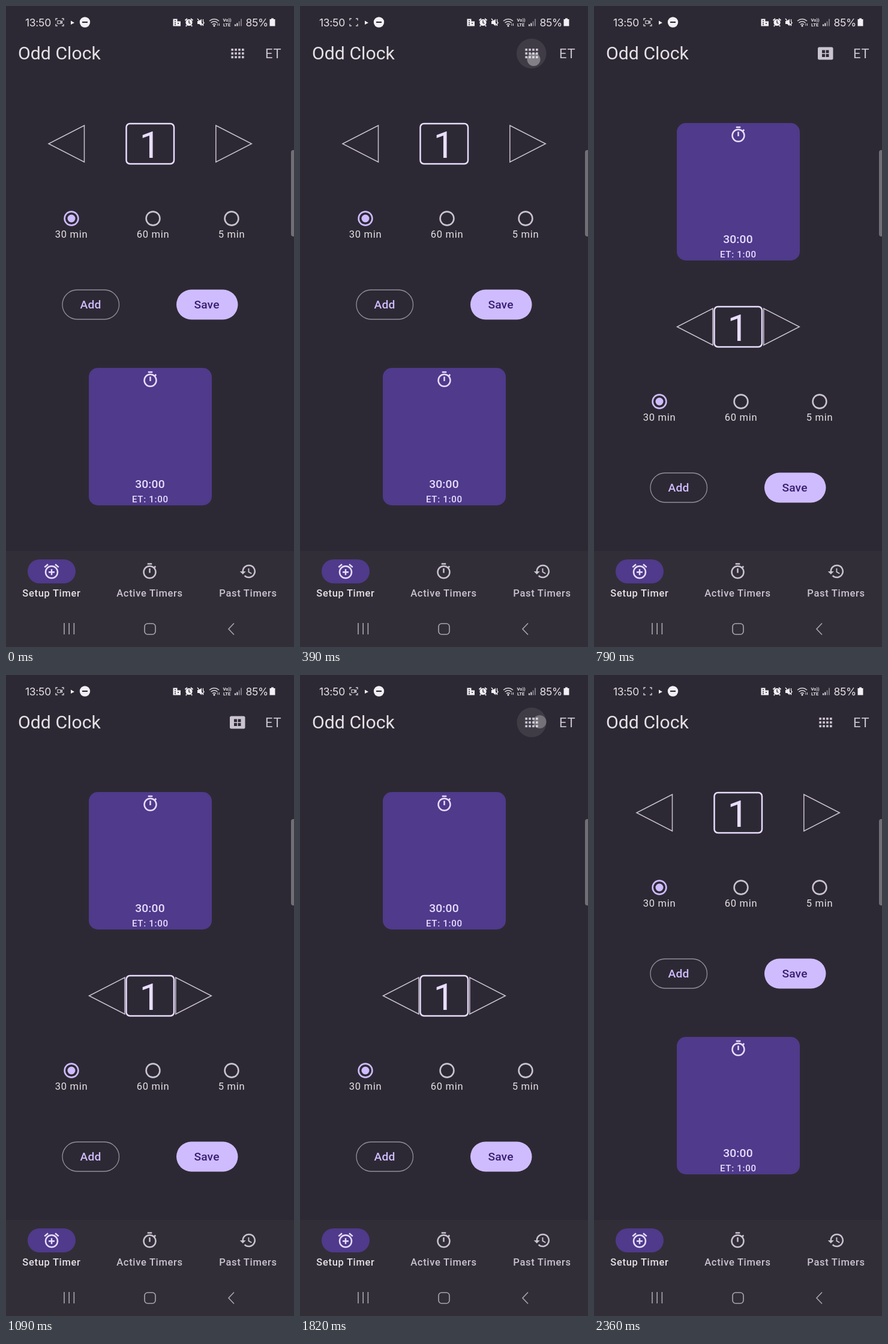
Write an HTML page that moves like this. It is 480 by 1068 pixels and loops after 2.39 s.

```html
<!DOCTYPE html>
<html lang="en">
<head>
<meta charset="utf-8">
<title>Timer</title>
<style>
html, body { margin: 0; width: 100%; height: 100%; overflow: hidden; background: #2d2934; }
svg { display: block; width: 480px; height: 1068px; }
text { font-family: Roboto, sans-serif; fill: #e6e1e5; }
.mid { text-anchor: middle; }
.label { font-size: 16.5px; letter-spacing: .69px; }
.bold { font-weight: 500; }
.button { font-size: 19.25px; font-weight: 500; letter-spacing: .14px; }
.status { font: 17.5px Inter, sans-serif; letter-spacing: -.3px; }
.tiny { font-size: 7.5px; font-weight: 700; }
.line { fill: none; stroke: #cac4d0; }
.soft { fill: #cac4d0; }
.pale { color: #e8ddff; }
.gray { color: #cac4d0; }
</style>
</head>
<body>
<svg viewBox="0 0 480 1068">
  <defs>
    <g id="timer" fill="none" stroke="currentColor" stroke-width="2">
      <circle cx="12" cy="13" r="8"/>
      <path d="M9 2h6M12 8v6M18 7l1.8-1.8"/>
    </g>
    <g id="alarm" fill="none" stroke="currentColor" stroke-width="2">
      <circle cx="12" cy="13" r="8"/>
      <path d="M2.6 6.5l4.6-3.9M21.4 6.5l-4.6-3.9M8 13h8M12 9v8"/>
    </g>
    <g id="history" fill="none" stroke="currentColor" stroke-width="2">
      <path d="M5 12a8 8 0 1 1 2.35 5.65"/>
      <path d="M12.75 8v4.7l3.9 2.3" stroke-width="1.5"/>
      <path d="M1 12h8l-4 4z" fill="currentColor" stroke="none"/>
    </g>
  </defs>
  <rect width="480" height="1068" fill="#2d2934"/>

  <!-- status bar -->
  <g fill="#f2f0f4">
    <text class="status" x="32" y="33.5">13:50</text>
    <path d="M83 24v-3h3M93 21h3v3M96 30v3h-3M86 33h-3v-3" fill="none" stroke="#d0cdd2" stroke-width="1.4"/>
    <path id="camera" d="M86 24.5h5v5h-5zM91 27l2.5-2v4z" fill="none" stroke="#d0cdd2" stroke-width="1.2"/>
    <path d="M108 24.5l6 3.5-6 3z"/>
    <circle cx="131.5" cy="27" r="8.7"/>
    <path d="M127 27h9" stroke="#2d2934" stroke-width="2.2"/>
    <path d="M278.5 21.5h7v4h5.5v8h-12.500z"/>
    <path d="M281 24.500h2M281 28h2M286 29h2M281 31h2" stroke="#2d2934" stroke-width="1.6"/>
    <circle cx="305" cy="27.500" r="5.600"/>
    <path d="M298.500 24l3.500-3M311.500 24l-3.500-3M301 32l-1 2M309 32l1 2" stroke="#f2f0f4" stroke-width="1.800"/>
    <path d="M305 24v4l2.500 1" fill="none" stroke="#2d2934" stroke-width="1.300"/>
    <path d="M319 25h3l4-3.500v12l-4-3.500h-3z"/>
    <path d="M319 21l10 12M328.500 22v4l1.500 2-1.500 2v3" fill="none" stroke="#f2f0f4" stroke-width="1.300"/>
    <g fill="none" stroke="#d8d5da" stroke-width="1.600">
      <path d="M339 25q8-6.500 16 0M341.500 28q5.500-4.500 11 0M344 31q3-2.500 6 0"/>
      <path d="M353 33v-4m2.500 4v-4" stroke-width="1"/>
    </g>
    <circle cx="347" cy="33" r="1.500"/>
    <text class="tiny" x="361.500" y="26">Vo))</text>
    <text class="tiny" x="362" y="34">LTE</text>
    <path d="M382 33.500v-3M385.300 33.500v-5" stroke="#f2f0f4" stroke-width="1.800"/>
    <path d="M388.600 33.500v-8M392 33.500v-12" stroke="#858189" stroke-width="1.800"/>
    <text class="status" x="399.500" y="33.500">85%</text>
    <path d="M442 20.500h4v1.500h2.500v11.500h-9v-11.500h2.500z"/>
  </g>

  <!-- app bar -->
  <text x="20" y="89" font-size="30.25">Odd Clock</text>
  <circle id="ripple" fill="#fff"/>
  <g id="dots" class="soft"></g>
  <g id="tiles">
    <rect x="373" y="68.500" width="25.500" height="21" rx="2.500" class="soft"/>
    <path d="M380 73.500h5v5h-5zM386.500 73.500h5v5h-5zM380 80h5v5h-5zM386.500 80h5v5h-5z" fill="#2d2934"/>
  </g>
  <text class="soft" x="432" y="86.500" font-size="22" letter-spacing=".69" style="fill:#cac4d0">ET</text>
  <circle id="touch" r="11" fill="#fff"/>

  <!-- controls -->
  <g id="controls">
    <path id="left" class="line" stroke-width="1.500" d="M130.500 199v61l-59.500-30.500z"/>
    <path id="right" class="line" stroke-width="1.500" d="M349.800 199v61l59.500-30.500z"/>
    <rect x="200.500" y="196" width="79.500" height="67" rx="6" fill="none" stroke="#e8ddff" stroke-width="2.500"/>
    <text class="mid" x="240" y="253" font-size="62" style="fill:#e8ddff">1</text>
    <g id="radios"></g>
    <circle cx="109" cy="354" r="6.500" fill="#cfbcff"/>
    <rect x="94" y="473" width="94.500" height="49" rx="24.500" fill="none" stroke="#938f99" stroke-width="1.300"/>
    <text class="button mid" x="141" y="504" style="fill:#cfbcff">Add</text>
    <rect x="284" y="472.500" width="102.500" height="50" rx="25" fill="#cfbcff"/>
    <text class="button mid" x="334.500" y="504" style="fill:#381e72">Save</text>
  </g>
  <g id="card">
    <rect x="138" y="603" width="205" height="229" rx="15" fill="#4f3a8b"/>
    <use href="#timer" class="pale" transform="translate(225.500 607.500) scale(1.250)"/>
    <text class="button mid" x="240" y="803" style="fill:#e8ddff">30:00</text>
    <text class="bold mid" x="240.400" y="826.500" font-size="15.100" letter-spacing=".69" style="fill:#e8ddff">ET: 1:00</text>
  </g>

  <!-- bottom bars -->
  <rect y="908" width="480" height="160" fill="#322e38"/>
  <rect x="36" y="922" width="80" height="40" rx="20" fill="#4f3a8b"/>
  <g id="tabs"></g>
  <g fill="none" stroke="#aaa7ad" stroke-width="1.600">
    <path d="M97 1028v19M105.200 1028v19M113.400 1028v19"/>
    <rect x="231" y="1029" width="18" height="18" rx="5"/>
    <path d="M380 1028.500l-9 9.500 9 9.500"/>
  </g>
  <path d="M480 240h-1a4 4 0 0 0-4 4v136a4 4 0 0 0 4 4h1z" fill="#716e75"/>
</svg>
<script>
const $ = id => document.getElementById(id);
const clamp = v => Math.max(0, Math.min(1, v));
const set = (id, attrs) => {
  for (const key in attrs) $(id).setAttribute(key, attrs[key]);
};
const show = (id, on) => set(id, { visibility: on ? 'visible' : 'hidden' });
const shift = (id, x, y) => set(id, { transform: `translate(${x} ${y})` });

for (let i = 0; i < 12; i++)
  $('dots').innerHTML += `<rect x="${375.3 + i % 4 * 5.9}" y="${71 + (i >> 2) * 6.2}" width="3.7" height="3.7"/>`;

[[109, '30 min', '#cfbcff'], [245, '60 min', '#cac4d0'], [376, '5 min', '#cac4d0']].forEach(([x, label, color]) =>
  $('radios').innerHTML += `<circle cx="${x}" cy="354" r="11.4" fill="none" stroke="${color}" stroke-width="2.6"/>
    <text class="label mid" x="${x}" y="386">${label}</text>`);

[[76, 'Setup Timer', 'alarm'], [239.5, 'Active Timers', 'timer'], [403.5, 'Past Timers', 'history']].forEach(([x, label, icon], i) =>
  $('tabs').innerHTML += `<use href="#${icon}" class="${i ? 'gray' : 'pale'}" transform="translate(${x - 15} 927) scale(1.25)"/>
    <text class="label bold mid" x="${x}" y="984" style="fill:${i ? '#cac4d0' : '#e6e1e5'}">${label}</text>`);

const LOOP = 2390;
const taps = [
  { down: 190, up: 415, x: 389.5, y: 89 },
  { down: 1630, up: 1810, x: 399.5, y: 78 }
];

function draw() {
  const t = performance.now() % LOOP;
  const between = (a, b) => t >= a && t < b;
  const tap = taps[t < 1200 ? 0 : 1];
  const age = t - tap.down;
  const grow = 1 - (1 - clamp(age / 225)) ** 2;

  set('ripple', {
    cx: tap.x + (385.7 - tap.x) * grow,
    cy: tap.y + (79 - tap.y) * grow,
    r: 8 + 17 * grow,
    opacity: .09 * clamp(age / 75) * clamp(1 - (age - 225) / 150)
  });
  set('touch', {
    cx: tap.x,
    cy: tap.y,
    opacity: age < 0 ? 0 : .35 * clamp(1 - (t - tap.up) / 50)
  });

  const tiled = between(420, 1810);
  show('tiles', tiled);
  show('dots', !tiled);
  show('camera', (t + 350) % 1000 < 500);

  const cardFirst = between(440, 1840);
  shift('card', 0, cardFirst ? -408 : 0);
  shift('controls', 0, cardFirst ? 305 : 0);
  shift('left', cardFirst ? 67.5 : 0, 0);
  shift('right', cardFirst ? -67 : 0, 0);
  requestAnimationFrame(draw);
}
draw();
</script>
</body>
</html>
```
